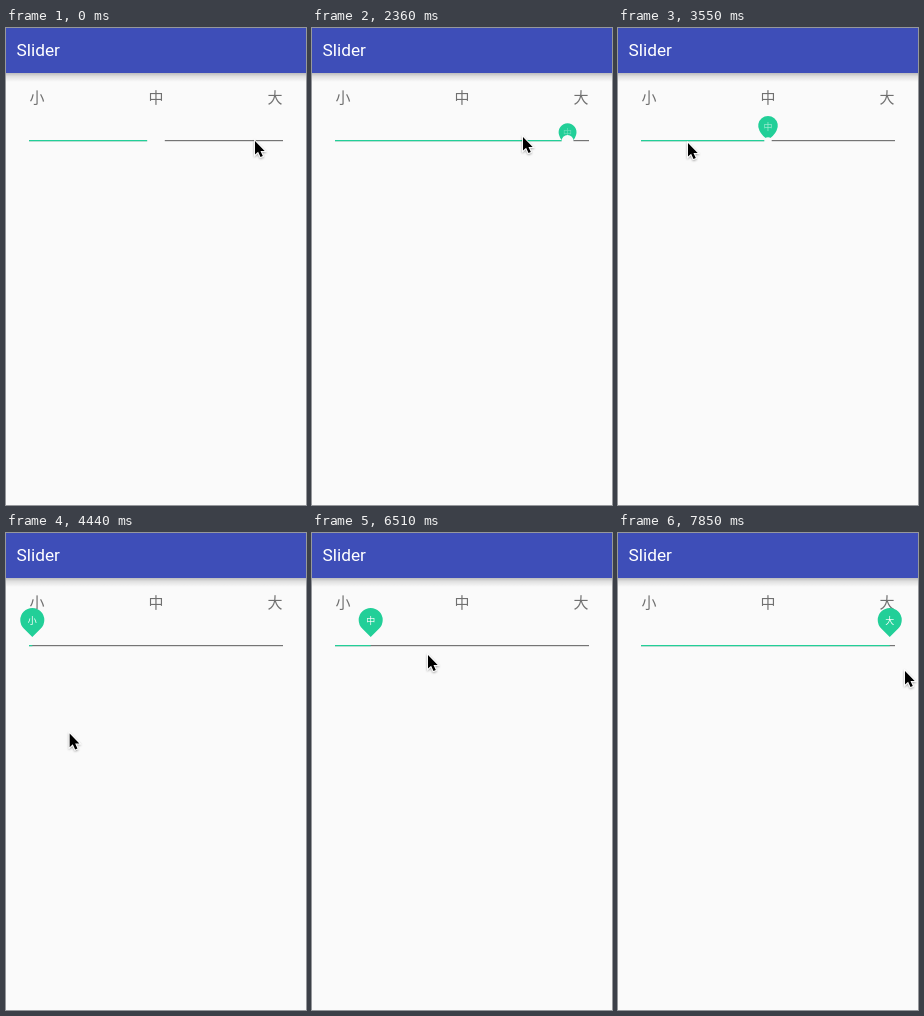
Write an HTML page that moves like this. It is 300 by 477 pixels and loops after 8000 ms.

```html
<!DOCTYPE html>
<html lang="zh">
<head>
<meta charset="utf-8">
<title>Slider</title>
<style>
  html, body { margin: 0; width: 100%; height: 100%; overflow: hidden; background: #fafafa; }
  svg { display: block; width: 300px; height: 477px; }
  .title { font: 400 17.3px Roboto, sans-serif; fill: #fff; }
  .scale, #mark { font-family: "Noto Sans CJK SC", "Noto Sans CJK JP", "Noto Sans CJK", sans-serif; text-anchor: middle; }
  .scale { font-size: 15px; fill: #707070; }
  #mark { font-size: 9px; fill: #fff; }
  #pin, #done { fill: #22cf98; }
</style>
</head>
<body>
<svg viewBox="0 0 300 477">
  <defs>
    <linearGradient id="fade" x2="0" y2="1">
      <stop offset="0" stop-opacity=".25"/>
      <stop offset=".4" stop-opacity=".1"/>
      <stop offset="1" stop-opacity="0"/>
    </linearGradient>
    <filter id="soft" x="-50%" y="-50%" width="200%" height="200%">
      <feDropShadow dx="0" dy="1" stdDeviation=".9" flood-opacity=".4"/>
    </filter>
  </defs>
  <rect width="300" height="477" fill="#fafafa"/>
  <rect y="45" width="300" height="9" fill="url(#fade)"/>
  <rect width="300" height="45" fill="#3e4eb8"/>
  <text class="title" x="10.5" y="28">Slider</text>
  <g class="scale">
    <text x="31" y="74.5">小</text>
    <text x="150" y="74.5">中</text>
    <text x="269" y="74.5">大</text>
  </g>
  <rect x="23" y="112" width="254" height="1.2" fill="#747474"/>
  <rect id="done" x="23" y="112" height="1.2"/>
  <path id="pin"/>
  <text id="mark"></text>
  <circle id="hole" cy="112.9" fill="#fafafa"/>
  <g id="cursor" filter="url(#soft)">
    <path d="M0 1V14.6L3.1 11.8L5.5 17L7.8 16L5.5 10.9H9.7Z" stroke="#fff" stroke-width="1.6" paint-order="stroke"/>
  </g>
</svg>
<script>
const LOOP = 8000, TICK = 148, LAST = 53;
const R = 8.5, TRACK_Y = 112.5, LEFT = 23;
const TRAVEL = 3.45, GROW = 2.4, SHRINK = 3;
const STOPS = [26.3, 150, 277], LABELS = '小中大';

// All times are in ticks.
const moves = [
  { at: 2.9, stop: 2 },
  { at: 15.07, stop: 1 },
  { at: 26, stop: 0 },
  { at: 42.82, stop: 1 },
  { at: 50, stop: 2 }
];
const touches = [
  { press: 2.9, release: 9.57 },
  { press: 15.07, release: 22.65 },
  { press: 26, release: 33.43 },
  { press: 41.6, release: LAST }
];
const glides = [
  { from: 0, to: 1, x: 268, y: 113, dip: 0 },
  { from: 11, to: 14, x: 211, y: 108, dip: 0 },
  { from: 17, to: 24, x: 70, y: 114, dip: 55 },
  { from: 27, to: 36, x: 51, y: 116, dip: 98 },
  { from: 39, to: 44, x: 116, y: 121, dip: 12 },
  { from: 48, to: 53, x: 287, y: 137, dip: 0 }
];

const $ = id => document.getElementById(id);
const clamp = u => Math.min(1, Math.max(0, u));
const ease = u => (1 - Math.cos(Math.PI * clamp(u))) / 2;
const mix = (a, b, u) => a + (b - a) * u;

function set(id, attrs) {
  for (const name in attrs) $(id).setAttribute(name, attrs[name]);
}

function thumbAt(t) {
  let x = STOPS[1], label = LABELS[1], fill = 0;
  for (const { at, stop } of moves) {
    if (t < at) break;
    x = mix(x, STOPS[stop], ease((t - at) / TRAVEL));
    label = LABELS[stop];
  }
  for (const { press, release } of touches)
    fill += ease((t - press) / GROW) - ease((t - release) / SHRINK);
  return { x, label, fill: clamp(fill) };
}

function pointerAt(t) {
  let x = 249, y = 112;
  for (const g of glides) {
    const u = clamp((t - g.from) / (g.to - g.from));
    x = mix(x, g.x, u);
    y = mix(y, g.y, u) + g.dip * Math.sin(Math.PI * u);
  }
  return [x, y];
}

// Circle that rises and sharpens into a drop as p goes from 0 to 1.
function drop(x, p) {
  const y = TRACK_Y - 2 * R * p;
  const top = R * Math.hypot(1, p);
  const side = R * Math.SQRT1_2 / Math.sin(Math.PI * (1 - p) / 4);
  const to = (px, py) => p > 0.9 ? `L${px} ${py}` : `A${side} ${side} 0 0 1 ${px} ${py}`;
  return `M${x - R} ${y}A${top} ${top} 0 1 1 ${x + R} ${y}${to(x, y + R)}${to(x - R, y)}Z`;
}

function draw(t) {
  const { x, label, fill } = thumbAt(t);
  set('done', { width: Math.max(0, x - LEFT) });
  set('pin', { d: fill > 0.001 ? drop(x, fill) : '' });
  set('mark', { x, y: TRACK_Y - 3 * R * fill + 4, opacity: fill });
  $('mark').textContent = label;
  set('hole', { cx: x, r: (R + 0.4) * (1 - fill) });
  set('cursor', { transform: `translate(${pointerAt(t)})` });
}

const start = performance.now();
function loop(now) {
  const ms = Math.max(0, now - start) % LOOP;
  draw(Math.min(LAST, Math.floor((ms + 18) / TICK)));
  requestAnimationFrame(loop);
}
draw(0);
requestAnimationFrame(loop);
</script>
</body>
</html>
```
